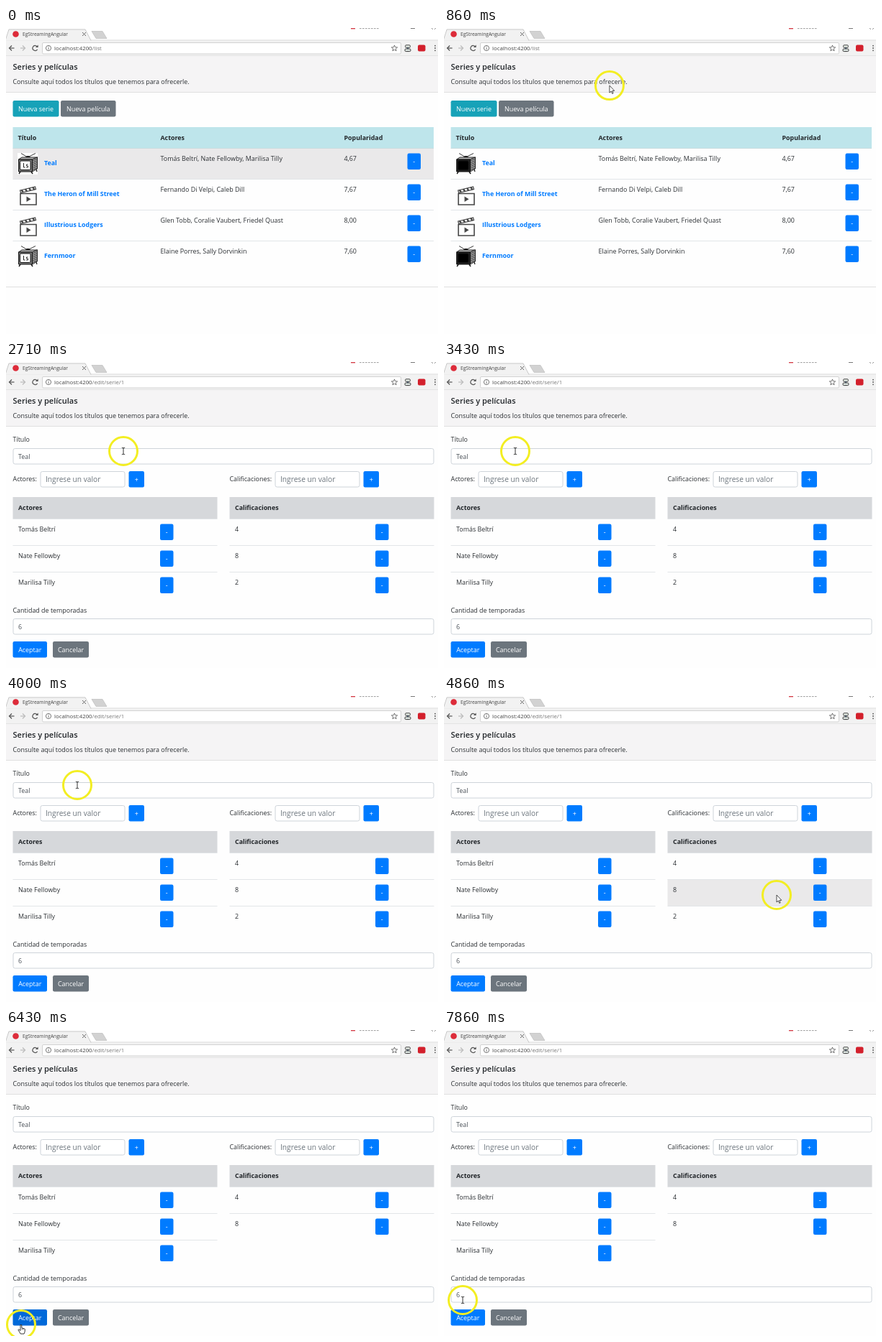
Write an HTML page with a canvas that moves like this. It is 600 by 426 pixels and loops after 8 s.

```html
<!DOCTYPE html>
<html lang="es">
<head>
<meta charset="utf-8">
<title>Series y películas</title>
<style>
html, body { margin: 0; width: 100%; height: 100%; overflow: hidden; background: #fefefe; }
canvas { display: block; width: 600px; height: 426px; }
</style>
</head>
<body>
<canvas id="stage"></canvas>
<script>
const W = 600, H = 426, LOOP = 8000, STEP = LOOP / 56;
const canvas = document.getElementById('stage');
const ctx = canvas.getContext('2d');
const dpr = window.devicePixelRatio || 1;
canvas.width = W * dpr;
canvas.height = H * dpr;

const FONT = '"Open Sans", "Noto Sans", sans-serif';
const BLUE = '#007bff', BLUE_DARK = '#0069d9', GRAY = '#6c757d', INK = '#2b2f33', LINE = '#e2e5e8';
const OPEN_EDIT = 2000, REMOVE_ROW = 5420;

const titles = [
  { name: 'Teal', cast: 'Tomás Beltrí, Nate Fellowby, Marilisa Tilly', score: '4,67', tv: true },
  { name: 'The Heron of Mill Street', cast: 'Fernando Di Velpi, Caleb Dill', score: '7,67' },
  { name: 'Illustrious Lodgers', cast: 'Glen Tobb, Coralie Vaubert, Friedel Quast', score: '8,00' },
  { name: 'Fernmoor', cast: 'Elaine Porres, Sally Dorvinkin', score: '7,60', tv: true }
];
const cast = titles[0].cast.split(', ');

// Pointer path: time, x, y
const path = [
  [0, 430, -40], [140, 430, -40], [850, 230, 80], [1290, 93, 156], [1570, 59, 187],
  [2000, 59, 187], [2560, 163, 124], [2860, 163, 124], [3430, 99, 124], [4000, 99, 124],
  [4290, 130, 270], [4570, 245, 366], [4857, 462, 277], [5140, 522, 311], [5500, 522, 311],
  [5700, 509, 319], [6000, 156, 346], [6285, 156, 346], [6425, 21, 410], [6700, 21, 410],
  [7140, 24, 403], [7420, 24, 403], [7855, 26, 376], [8000, 26, 376]
];

function pointerAt(t) {
  let i = 1;
  while (i < path.length - 1 && path[i][0] < t) i++;
  const [t0, x0, y0] = path[i - 1], [t1, x1, y1] = path[i];
  const p = Math.min(1, Math.max(0, (t - t0) / (t1 - t0)));
  const e = p * p * (3 - 2 * p);
  return { x: x0 + (x1 - x0) * e, y: y0 + (y1 - y0) * e, kind: 'arrow' };
}

function text(str, x, y, size = 8.92, color = INK, weight = 400) {
  ctx.font = `${weight} ${size}px ${FONT}`;
  ctx.fillStyle = color;
  ctx.fillText(str, x, y);
  return ctx.measureText(str).width;
}
function rect(x, y, w, h, color) {
  ctx.fillStyle = color;
  ctx.fillRect(x, y, w, h);
}
function round(x, y, w, h, r, fill, stroke) {
  ctx.beginPath();
  ctx.roundRect(x, y, w, h, r);
  if (fill) { ctx.fillStyle = fill; ctx.fill(); }
  if (stroke) { ctx.strokeStyle = stroke; ctx.lineWidth = 1; ctx.stroke(); }
}
function poly(points, stroke, width = 1, fill, close) {
  ctx.beginPath();
  for (let i = 0; i < points.length; i += 2) ctx.lineTo(points[i], points[i + 1]);
  if (close) ctx.closePath();
  if (fill) { ctx.fillStyle = fill; ctx.fill(); }
  if (stroke) { ctx.strokeStyle = stroke; ctx.lineWidth = width; ctx.stroke(); }
}
function circle(x, y, r, fill, stroke, width = 1, from = 0, to = Math.PI * 2) {
  ctx.beginPath();
  ctx.arc(x, y, r, from, to);
  if (fill) { ctx.fillStyle = fill; ctx.fill(); }
  if (stroke) { ctx.strokeStyle = stroke; ctx.lineWidth = width; ctx.stroke(); }
}
const inside = (m, x, y, w, h) => m.x >= x && m.x < x + w && m.y >= y && m.y < y + h;

function button(m, label, x, y, w, color = BLUE, hover = BLUE_DARK, h = 22.5) {
  const over = inside(m, x, y, w, h);
  if (over) m.kind = 'hand';
  round(x, y, w, h, 2.2, over ? hover : color);
  ctx.textAlign = 'center';
  text(label, x + w / 2, y + h / 2 + 3.3, 8.92, '#fff');
  ctx.textAlign = 'left';
}
function input(m, value, x, y, w, size, color) {
  if (inside(m, x, y, w, 22)) m.kind = 'beam';
  round(x + .5, y + .5, w - 1, 21.5, 2.5, '#fff', '#ced4da');
  text(value, x + 7.5, y + 14.6, size, color);
}

function browser(url) {
  rect(0, 0, W, 17, '#fff');
  rect(0, 17, W, 21, '#f2f2f2');
  rect(0, 16.5, W, .8, '#d8d8d8');
  poly([-1, 17.5, 4, 2, 110, 2, 118, 17.5], '#bbb', .8, '#f2f2f2');
  poly([119, 4.5, 134, 4.5, 140, 14.5, 125, 14.5], '#bdbdbd', .7, '#d2d2d2', true);
  circle(13.5, 8.5, 4.3, '#dd2c3a');
  text('EgStreamingAngular', 23, 11.2, 6.65, '#444');
  poly([106, 6, 111, 11], '#666', 1);
  poly([111, 6, 106, 11], '#666', 1);

  // Clipped title bar
  rect(479, 0, 6, 1.5, '#d9505a');
  for (let x = 491; x < 518; x += 4) rect(x, 0, 2.6, 1.2, '#aaa');
  rect(562, 0, 6, 1, '#777');
  poly([591, 0, 593, 2], '#777', .8);
  poly([597, 0, 595, 2], '#777', .8);

  poly([11.5, 28, 4.5, 28], '#555', 1.2);
  poly([8, 24.5, 4.5, 28, 8, 31.5], '#555', 1.2);
  poly([20, 28, 26.5, 28], '#bbb', 1.2);
  poly([23, 24.5, 26.5, 28, 23, 31.5], '#bbb', 1.2);
  circle(40.5, 28, 3.5, null, '#555', 1.2, .5, 5.6);
  poly([41, 27, 44.6, 27, 44.6, 23.4], null, 1, '#555', true);

  round(50.5, 20.5, 498, 15.5, 1.5, '#fff', '#d2d2d2');
  circle(59, 28, 3.6, null, '#666', .9);
  rect(58.6, 27.3, .9, 2.8, '#666');
  rect(58.6, 25.6, .9, .9, '#666');
  const host = text('localhost:4200', 67, 30.6, 7.8, '#444');
  text(url, 67 + host, 30.6, 7.8, '#757575');

  const star = [];
  for (let i = 0; i < 10; i++) {
    const a = i * Math.PI / 5 - Math.PI / 2, r = i % 2 ? 1.9 : 4.4;
    star.push(539.5 + Math.cos(a) * r, 28.3 + Math.sin(a) * r);
  }
  poly(star, '#555', .8, null, true);
  round(554.5, 23.8, 7, 3.4, 1.5, '#e8efe8', '#444');
  round(554, 29, 8, 3.6, 1.5, '#dfe8e4', '#333');
  rect(557, 27, 2, 2, '#456');
  round(572, 23.5, 10.5, 9, 2, '#d3202c');
  for (const y of [24.7, 28, 31.3]) circle(596, y, .9, '#555');
}

function heading() {
  rect(0, 38, W, H, '#fefefe');
  rect(0, 38, W, 51, '#f5f4f5');
  rect(0, 38, W, .8, '#e0e0e0');
  rect(0, 89, W, 1, '#e0e0e0');
  text('Series y películas', 9.5, 58, 11, '#212529', 600);
  text('Consulte aquí todos los títulos que tenemos para ofrecerle.', 9.5, 78.3);
}

// Boxy set in slight perspective: front on the left, speaker side on the right
function tvIcon(y, dark) {
  rect(16, y, 28, 30, '#fff');
  poly([21, y + .5, 30, y + 6, 41, y + .5], '#222', .9);
  poly([27, y + 6, 29, y + 4, 32, y + 4, 34, y + 6], null, 1, '#222');
  poly([17.5, y + 9, 22, y + 6, 43.5, y + 6, 36.5, y + 9], '#111', .9, '#bbb', true);
  poly([36.5, y + 9, 43.5, y + 6, 43.5, y + 22, 36.5, y + 26], '#111', .9, '#aaa', true);
  for (let i = 0; i < 6; i++) {
    const side = y + 11 + i * 2.5;
    poly([37, side, 43, side - 2.6], '#222', .9);
  }
  rect(17.5, y + 9, 19, 17, dark ? '#222' : '#777');
  poly([17.5, y + 9, 36.5, y + 9, 36.5, y + 26, 17.5, y + 26], '#111', 1, null, true);
  round(19.5, y + 11, 14.5, 12.5, 1.5, dark ? '#000' : '#fff', '#111');
  if (!dark) {
    poly([24.5, y + 14, 24.5, y + 20, 26.5, y + 20], '#222', 1);
    poly([30.5, y + 16, 28.5, y + 16, 28.5, y + 18, 30.5, y + 18, 30.5, y + 20, 28, y + 20], '#222', .9);
  }
  poly([20, y + 26, 18, y + 29], '#111', 1.4);
  poly([35, y + 26, 37, y + 29], '#111', 1.4);
  poly([42, y + 23, 43, y + 26], '#111', 1.2);
}

function clapIcon(y) {
  const ink = '#464646';
  poly([20, y + 13, 42, y + 13, 42, y + 28.5, 20, y + 28.5], ink, 1.6, '#fff', true);
  poly([28.5, y + 17, 34.5, y + 20.7, 28.5, y + 24.4], null, 1, ink, true);
  poly([19.5, y + 8.5, 40.5, y + 3.5, 41.5, y + 7, 20.5, y + 12], ink, 1.2, '#fff', true);
  for (let i = 0; i < 4; i++) {
    const x = 20.5 + i * 5.2, top = y + 8.2 - i * 1.23;
    poly([x, top, x + 2.4, top - .6, x + 4.4, top + 2.7, x + 2, top + 3.3], null, 1, ink, true);
  }
}

function listView(m, t, step) {
  button(m, 'Nueva serie', 9.5, 101, 64, '#17a2b8', '#138496');
  button(m, 'Nueva película', 76, 101, 76.5, GRAY, '#5a6268');
  rect(9.5, 138, 584.5, 29.5, '#bee5eb');
  ['Título', 'Actores', 'Popularidad'].forEach((label, i) =>
    text(label, [16.5, 214.5, 469.5][i], 156, 8.85, '#212529', 700));
  const darkTv = Math.floor(step / 4) % 2 === 1;
  titles.forEach((item, i) => {
    const y = 167 + i * 43;
    if (inside(m, 9, y, 585, 43) || (i === 0 && m.y < 0)) rect(9.5, y, 584.5, 43, '#eae9ea');
    rect(9.5, y, 584.5, 1, i ? LINE : '#c9dcdf');
    if (item.tv) tvIcon(y + 7, darkTv);
    else clapIcon(y + 7.5);
    const over = inside(m, 52, y + 14, 18, 14);
    const width = text(item.name, 53, y + 24.2, 8.85, over ? '#0056b3' : BLUE, 700);
    if (over) {
      m.kind = 'hand';
      rect(53, y + 25.2, width, .9, '#0056b3');
    }
    text(item.cast, 214.5, y + 18.2);
    text(item.score, 469.5, y + 18.2);
    button(m, '-', 557.5, y + 7.5, 18.5);
  });
  rect(0, 360, W, 1, '#e0e0e0');
  if (t > 1640) {
    round(59.5, 201.5, 48, 12, 0, '#f3f3f3', '#d8d8d8');
    text('6 temporadas', 62, 209.7, 6.6, '#aaa');
  }
}

function editTable(m, title, rows, x, buttonX) {
  rect(x, 188, 284, 30, '#d6d8db');
  text(title, x + 7.5, 206.3, 8.85, '#212529', 700);
  rows.forEach((label, i) => {
    const y = 218 + i * 37;
    if (inside(m, x, y, 284, 37)) rect(x, y, 284, 37, '#eae9ea');
    rect(x, y, 284, 1, LINE);
    text(label, x + 7.5, y + 18);
    button(m, '-', buttonX, y + 7.5, 18.5);
  });
}

function editView(m, t) {
  text('Título', 9.5, 111.3);
  input(m, titles[0].name, 9.5, 120, 585, 8.92, '#495057');
  text('Actores:', 9.5, 166.3);
  input(m, 'Ingrese un valor', 47.5, 152, 118, 10.2, GRAY);
  button(m, '+', 170.5, 152, 21.5);
  text('Calificaciones:', 310.5, 166.3);
  input(m, 'Ingrese un valor', 373.5, 152, 118, 10.2, GRAY);
  button(m, '+', 496.5, 152, 21.5);
  editTable(m, 'Actores', cast, 9.5, 214);
  editTable(m, 'Calificaciones', t < REMOVE_ROW ? ['4', '8', '2'] : ['4', '8'], 310.5, 513);
  text('Cantidad de temporadas', 9.5, 348.5);
  input(m, '6', 9.5, 357, 585, 8.92, '#495057');
  button(m, 'Aceptar', 9.5, 389, 47.5);
  button(m, 'Cancelar', 65, 389, 50, GRAY, '#5a6268');
}

function pointer({ x, y, kind }) {
  circle(x, y, 19.5, null, '#f3ee22', 3);
  ctx.save();
  ctx.translate(x, y);
  if (kind === 'beam') {
    poly([-2.2, -4.8, 0, -4.3, 2.2, -4.8], '#333', .9);
    poly([0, -4.3, 0, 4.3], '#333', 1);
    poly([-2.2, 4.8, 0, 4.3, 2.2, 4.8], '#333', .9);
  } else if (kind === 'hand') {
    poly([-1, .5, .7, .5, 1, 5, 4.6, 5.8, 5.4, 6.9, 5, 10.5, 4, 13, -.8, 13,
      -2.5, 10, -4.2, 7.5, -3.2, 6.7, -1, 8.5], '#222', .9, '#fff', true);
    poly([1.2, 5.5, 1.2, 7.5], '#222', .6);
    poly([3, 5.7, 3, 7.5], '#222', .6);
  } else {
    poly([0, 0, 0, 10, 2.3, 8, 3.8, 11.4, 5.2, 10.8, 3.8, 7.5, 6.8, 7.3],
      '#222', .8, '#fff', true);
  }
  ctx.restore();
}

function draw(now) {
  const step = Math.floor(((now % LOOP) + 5) / STEP) % 56;
  const t = step * STEP;
  const m = pointerAt(t);
  const editing = t >= OPEN_EDIT;
  ctx.setTransform(dpr, 0, 0, dpr, 0, 0);
  heading();
  browser(editing ? '/edit/serie/1' : '/list');
  if (editing) editView(m, t);
  else listView(m, t, step);
  pointer(m);
}

let start;
function tick(now) {
  start ??= now;
  draw(now - start);
  requestAnimationFrame(tick);
}
requestAnimationFrame(tick);
</script>
</body>
</html>
```
